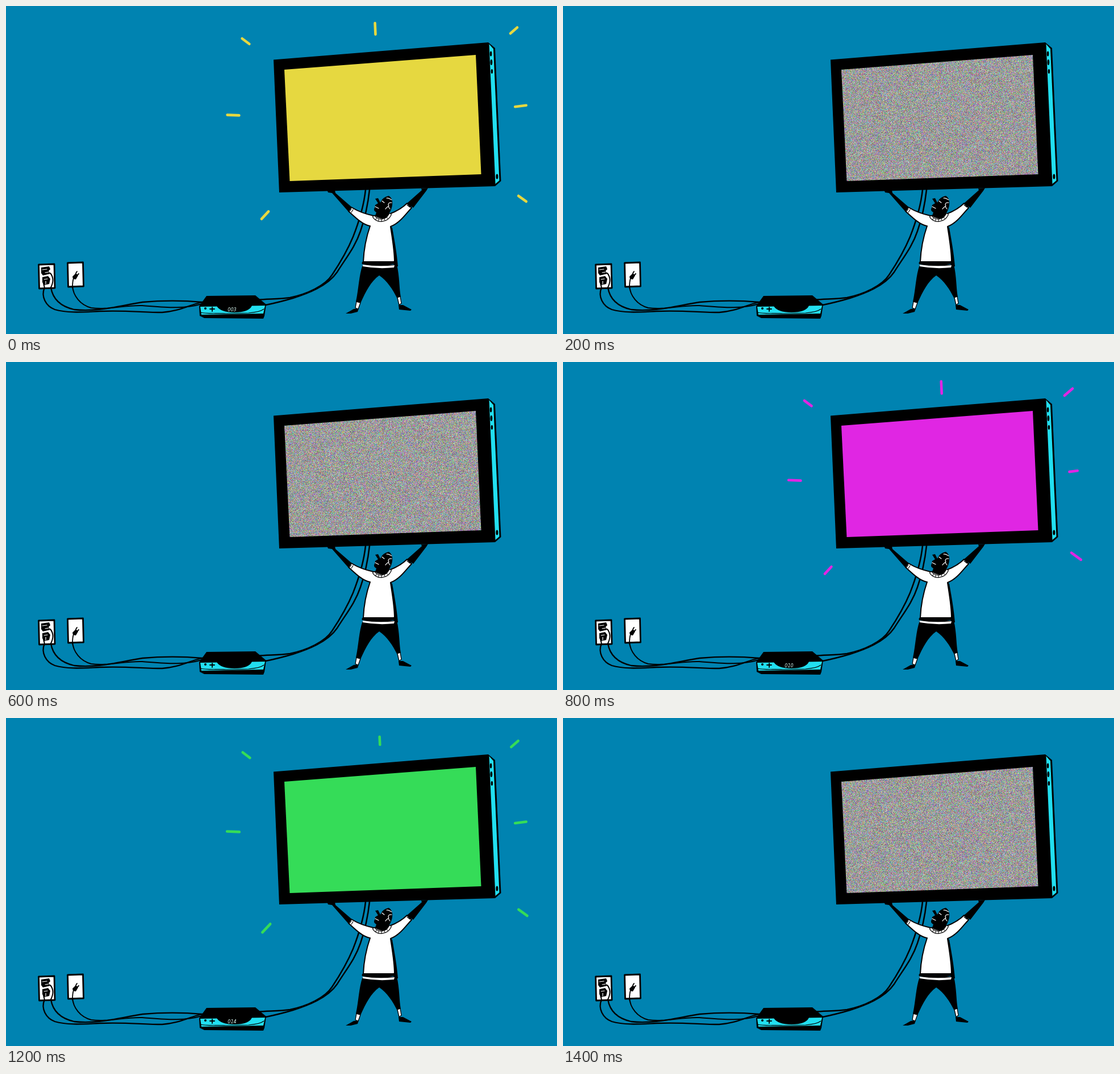
Recreate the animation shown at these times as an HTML page with a canvas. Size 970 by 577 pixels, loop 1.6 s.

```html
<!DOCTYPE html>
<html lang="en">
<head>
<meta charset="utf-8">
<title>Big screen</title>
<style>
html, body { margin: 0; width: 100%; height: 100%; overflow: hidden; background: #0083b1; }
canvas { display: block; }
</style>
</head>
<body>
<canvas id="stage" width="970" height="577"></canvas>
<script>
const ctx = document.getElementById('stage').getContext('2d');
const BLUE = '#0083b1', CYAN = '#22dff0', BLACK = '#000', WHITE = '#fff';
const STEP = 200;
const SCREEN = new Path2D('M490 112L827 86L836.5 296L499.5 308Z');

// Channels alternate with static; reach and drift move the rays around the set
const channels = [
  { color: '#e6d840', label: '003', reach: 1, drift: 0 },
  { color: CYAN, label: '006', reach: 1.03, drift: 16 },
  { color: '#e026e3', label: '010', reach: 0.97, drift: 16 },
  { color: '#35dc58', label: '014', reach: 1, drift: 8 }
];
const center = { x: 660, y: 200 };
const raySpots = [[422, 62], [650, 40], [894, 43], [400, 192], [906, 176], [909, 339], [456, 368]];

function seeded(seed) {
  return () => {
    seed = (Math.imul(seed, 1664525) + 1013904223) >>> 0;
    return seed / 4294967296;
  };
}

function fill(d, color = BLACK) {
  ctx.fillStyle = color;
  ctx.fill(new Path2D(d));
}

function line(d, width = 2, color = BLACK) {
  ctx.strokeStyle = color;
  ctx.lineWidth = width;
  ctx.lineCap = ctx.lineJoin = 'round';
  ctx.stroke(new Path2D(d));
}

function outlined(d, width) {
  fill(d, WHITE);
  line(d, width);
}

function dot(x, y, rx, ry = rx) {
  ctx.fillStyle = BLACK;
  ctx.beginPath();
  ctx.ellipse(x, y, rx, ry, 0, 0, Math.PI * 2);
  ctx.fill();
}

function makeStatic(w, h) {
  const c = document.createElement('canvas');
  c.width = w;
  c.height = h;
  const g = c.getContext('2d'), img = g.createImageData(w, h), rand = seeded(71);
  for (let i = 0; i < img.data.length; i++) {
    img.data[i] = i % 4 === 3 ? 255 : 92 + 126 * rand();
  }
  g.putImageData(img, 0, 0);
  return c;
}
const noise = makeStatic(350, 226);

function drawCables() {
  line('M633 323C630 352 622 378 611 406C601 430 588 452 574 473C562 492 530 507 500 513C480 516 460 515 443 517', 2.5);
  line('M640 323C637 350 631 376 624 396C615 423 600 441 583 468C566 493 530 506 505 514C488 519 472 523 457 526', 2.5);
  line('M68 495C61 511 70 528 86 534C110 541 140 538 165 537C210 535 240 539 275 539C305 537 322 526 345 521', 2.3);
  line('M79 495C82 514 94 528 120 534C160 539 200 527 240 521C283 517 313 518 346 521', 2.3);
  line('M117 492C118 510 131 526 150 531C180 535 205 526 240 527C280 530 311 534 345 524', 2);
}

function drawOutlets() {
  outlined('M57.5 455L85 454L86 496L58.5 497Z', 2.8);
  outlined('M108.5 452L135.5 451L136.5 493L109.5 494Z', 2.8);
  fill('M62 460L76 458L78 463L75 466L78 471L65 474L62 470Z');
  fill('M64 477L74 475L78 480L76 489L67 491L64 486Z');
  line('M64 464L72 463M69 469L75 468M67 481L73 480M70 484L70 489', 1.2, WHITE);
  line('M78 470C83 476 84 485 79 495M66 488L68 496');
  fill('M117 476L123 470L127 474L123 481L118 480Z');
  line('M123 470L125 467M126 473L128 471M119 479C117 484 117 489 117 496', 1.8);
}

function drawBox() {
  fill('M353 510L439 509L458 525L455 545L453 550L349 549L341 545L340 528Z');
  fill('M342 529L456 527L453 541L344 543Z', CYAN);
  fill('M371 528Q402 526 433 527Q428 539 402 539Q378 539 371 528Z');
  line('M342 539C354 542 370 540 387 541L427 540C440 539 449 537 454 533', 1.2);
  dot(351, 532, 2);
  line('M363 530L363 537M359 533L367 533', 1.8);
}

function drawTv() {
  fill('M471 94.5L849 64L861 74L871.5 308L861 317L481 328Z');
  fill('M850.5 67L858 75.5L868.5 307L861.5 313Z', CYAN);
  dot(853.6, 84, 1.8, 4.5);
  dot(854.4, 99, 1.9, 5);
  dot(855.4, 115, 1.7, 4);
  dot(864.4, 300, 2, 4.5);
}

function drawMan() {
  // Arms
  fill('M565 323L579 324L580 329L610 355L603 362L574 329L567 328Z');
  fill('M731 321L743 320L740 325L717 355L706 347L732 324Z');

  // Trousers, socks and shoes
  fill('M628 455L688 455C693 476 692 495 695 512L689 515C681 499 671 483 657 474C642 485 634 501 624 523L616 520C621 497 621 475 628 455Z');
  outlined('M617 520L624 522L620 533L615 531Z', 1.3);
  outlined('M689 513L694 511L696 523L692 526Z', 1.3);
  fill('M598 541L612 533L621 532L619 538L607 541Z');
  fill('M691 526L699 526L714 534L712 536L692 534Z');

  // Jumper
  fill('M675 386L680 390C684 413 688 434 690 458L683 459Z');
  outlined('M603 361L608 354C621 362 633 366 647 369L675 366C688 361 698 355 706 347L714 355C703 367 693 382 677 388C680 408 684 430 684 450L629 450C630 428 634 407 641 387C628 385 615 372 603 361Z', 2);
  line('M629 452Q657 456 685 451', 5);
  fill('M628 455Q656 459 684 456L683 460Q655 463 628 458Z', WHITE);
  line('M605 361L608 357M608 363L611 358M706 350L711 354M709 348L713 352', 1.1);

  // Head over a ribbed collar
  line('M648 371C655 380 670 379 676 367', 5.5);
  line('M648 371C655 380 670 379 676 367', 3, WHITE);
  line('M652 373L651 376M656 375L656 378M661 375L661 379M666 374L667 377M670 371L672 374', 1);
  fill('M650 339L655 338L659 346C662 338 668 335 674 334C679 337 681 343 680 350C679 358 675 364 671 371C664 376 655 374 650 369L652 363C648 361 647 358 649 355L650 350L655 347Z');
  line('M650 353L656 356M662 343L666 346M670 338C674 337 676 340 679 341M679 346C673 345 672 349 674 352C671 353 670 355 668 357M673 353L676 357', 1.2, WHITE);
}

function drawRays({ color, reach, drift }, rand) {
  for (const [sx, sy] of raySpots) {
    const dx = sx - center.x, dy = sy - center.y;
    const angle = Math.atan2(dy * 1.3, dx);
    const cos = Math.cos(angle), sin = Math.sin(angle);
    const x = center.x + dx * reach + drift * sin ** 4;
    const y = center.y + dy * reach + drift * cos ** 4;
    const half = 7 + 4 * rand();
    line(`M${x - half * cos} ${y - half * sin}L${x + half * cos} ${y + half * sin}`, 4.6, color);
  }
}

function drawChannel(index) {
  const channel = channels[index];
  ctx.fillStyle = channel.color;
  ctx.fill(SCREEN);
  drawRays(channel, seeded(index + 5));
  ctx.fillStyle = '#d5f5ee';
  ctx.font = 'italic 8px "DejaVu Sans", sans-serif';
  ctx.textAlign = 'center';
  ctx.fillText(channel.label, 398, 536.5);
}

function drawStatic() {
  ctx.save();
  ctx.clip(SCREEN);
  ctx.drawImage(noise, 489, 84);
  ctx.restore();
}

function draw(t) {
  const step = Math.floor(t / STEP) % (channels.length * 2);
  ctx.fillStyle = BLUE;
  ctx.fillRect(0, 0, 970, 577);
  drawCables();
  drawOutlets();
  drawBox();
  drawTv();
  drawMan();
  if (step % 2) drawStatic();
  else drawChannel(step / 2);
}

const start = performance.now();
function loop() {
  draw(performance.now() - start);
  requestAnimationFrame(loop);
}
loop();
</script>
</body>
</html>
```
